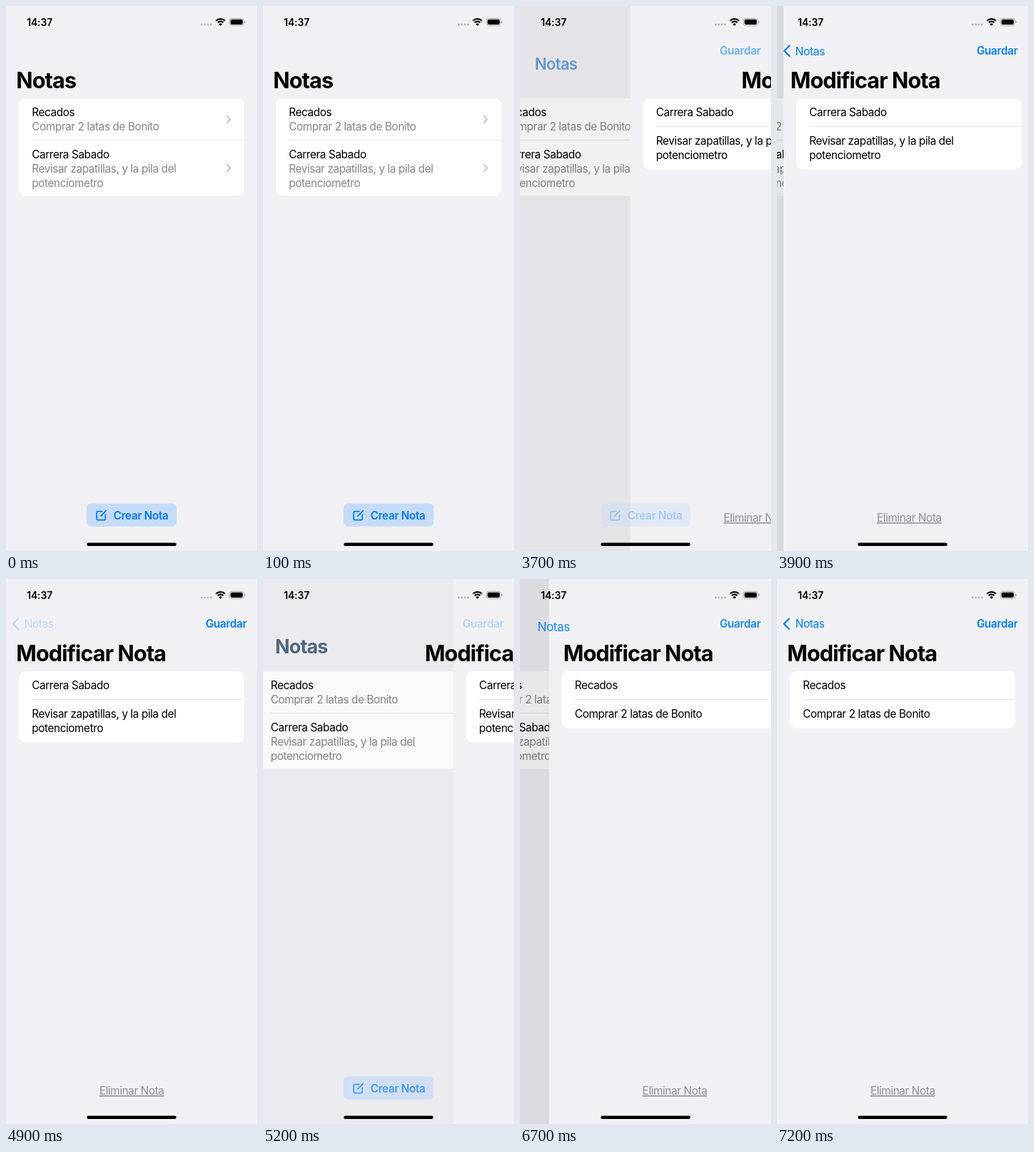
Write an HTML page that moves like this. It is 352 px wide and 762 px high and loops after 8 s.

```html
<!DOCTYPE html>
<html lang="es">
<head>
<meta charset="utf-8">
<title>Notas</title>
<style>
  html, body { margin: 0; width: 100%; height: 100%; overflow: hidden; background: #f1f1f5; }
  svg { display: block; width: 352px; height: 762px; }
  text {
    font: 400 15.34px Inter, "Open Sans", sans-serif;
    font-optical-sizing: none;
    letter-spacing: -.026em;
    white-space: pre;
  }
  .title { font-size: 30.7px; font-weight: 700; letter-spacing: -.031em; }
  .strong { font-weight: 600; letter-spacing: -.022em; }
  .clock { font-size: 13.9px; font-weight: 600; letter-spacing: -.007em; }
  .soft { fill: #85858a; }
  .blue { fill: #007aff; }
  .page { fill: #f1f1f5; }
  .card { fill: #fff; }
  .rule { stroke: #e0e0e3; stroke-width: .8; }
  .line { fill: none; stroke-linecap: round; stroke-linejoin: round; }
  .more { stroke: #c3c3c7; stroke-width: 1.8; }
  .delete { fill: #8e8e93; text-decoration: underline; }
</style>
</head>
<body>
<svg viewBox="0 0 352 762">
  <rect class="page" width="352" height="762"/>

  <g id="list">
    <rect class="card" x="18" y="129" width="316" height="136.5" rx="9"/>
    <text x="36.2" y="154">Recados</text>
    <text class="soft" x="36.2" y="174.2">Comprar 2 latas de Bonito</text>
    <path class="rule" d="M36 187.5H334"/>
    <text x="36.2" y="212.5">Carrera Sabado</text>
    <text class="soft" x="36.2" y="232.5">Revisar zapatillas, y la pila del</text>
    <text class="soft" x="36.2" y="252.5">potenciometro</text>
    <path class="line more" d="M309.8 153.8l4.8 4.7-4.8 4.7M309.8 221.8l4.8 4.7-4.8 4.7"/>
  </g>
  <rect id="dim" width="352" height="762"/>

  <g id="detail">
    <rect class="page" width="352" height="762"/>
    <g id="race">
      <rect class="card" x="18" y="129" width="316" height="99.4" rx="9"/>
      <text x="36.2" y="154">Carrera Sabado</text>
      <text x="36.2" y="193.8">Revisar zapatillas, y la pila del</text>
      <text x="36.2" y="213.8">potenciometro</text>
    </g>
    <g id="errands">
      <rect class="card" x="18" y="129" width="316" height="79.5" rx="9"/>
      <text x="36.2" y="154">Recados</text>
      <text x="36.2" y="193.8">Comprar 2 latas de Bonito</text>
    </g>
    <path class="rule" d="M36 168.5H334"/>
    <text class="delete" x="176.3" y="721" text-anchor="middle">Eliminar Nota</text>
  </g>

  <g id="create">
    <rect x="113" y="695.5" width="126.3" height="32.3" rx="6" fill="#c6dbf7"/>
    <path class="line" stroke="#007aff" stroke-width="1.7"
      d="M135 706.6H129.2a2 2 0 0 0-2 2V716.7a2 2 0 0 0 2 2H137.3a2 2 0 0 0 2-2V711M133 713.2L140.4 705.7"/>
    <text class="blue strong" x="150.7" y="718">Crear Nota</text>
  </g>

  <!-- navigation bar -->
  <text id="heading" class="title" x="14.3" y="115">Modificar Nota</text>
  <text id="big" class="title">Notas</text>
  <g id="back">
    <path id="arrow" class="line" stroke="#007aff" stroke-width="2.2" d="M17 55.5L9.7 62.7L17 69.9"/>
    <text id="small" class="blue">Notas</text>
  </g>
  <text id="save" class="blue strong" x="337.4" y="68" text-anchor="end">Guardar</text>

  <!-- status bar -->
  <text class="clock" x="29.2" y="27.5">14:37</text>
  <g fill="#b9b9bd">
    <circle cx="274.4" cy="26" r="1.4"/>
    <circle cx="278.8" cy="26" r="1.4"/>
    <circle cx="283.2" cy="26" r="1.4"/>
    <circle cx="287.4" cy="26" r="1.4"/>
  </g>
  <path fill="none" stroke="#000" stroke-width="2.1"
    d="M294.4 20.8a9 9 0 0 1 12.8 0M296.9 23.2a5.5 5.5 0 0 1 7.8 0"/>
  <path d="M300.8 27.8l-2.3-2.3a3.25 3.25 0 0 1 4.6 0z"/>
  <rect x="313.3" y="17.3" width="20.2" height="10.2" rx="3.2" fill="none" stroke="#a3a3a7" stroke-width=".9"/>
  <rect x="314.8" y="18.8" width="17.2" height="7.2" rx="2"/>
  <path d="M334.5 20.8q1.5 .5 1.5 1.6t-1.5 1.6z" fill="#a3a3a7"/>
  <rect x="113.3" y="750.5" width="125.6" height="4.5" rx="2.25"/>
</svg>
<script>
  const LOOP = 8000, STEP = 100, WIDTH = 352;
  const PRESS = 4900, SWITCH = 6000;
  const moves = [
    { start: 3597, open: true },
    { start: 5050, open: false },
    { start: 6497, open: true }
  ];
  const el = {};
  document.querySelectorAll('[id]').forEach(node => el[node.id] = node);

  const clamp = v => Math.min(1, Math.max(0, v));
  const mix = (a, b, k) => a + (b - a) * k;
  const place = (node, x, y = 0, scale = 1) =>
    node.setAttribute('transform', `translate(${x} ${y}) scale(${scale})`);
  const fade = (node, k) => node.setAttribute('opacity', clamp(k));
  const show = (node, on) => node.setAttribute('display', on ? 'inline' : 'none');

  // Critically damped spring, from 0 to 1
  function spring(ms, speed) {
    const x = Math.max(0, ms) / 1000 * speed;
    const rest = (1 + x) * Math.exp(-x);
    return rest < .0015 ? 1 : 1 - rest;
  }

  function draw(t) {
    const move = moves.filter(m => m.start <= t).pop() || { start: t, open: true };
    const age = t - move.start;
    const toward = k => move.open ? k : 1 - k;
    const open = toward(spring(age, 18.26));
    const slide = toward(spring(age - 78, 28.3));

    place(el.list, -.3 * WIDTH * open);
    fade(el.dim, .1 * open);
    place(el.detail, WIDTH * (1 - open));
    show(el.race, t < SWITCH);
    show(el.errands, t >= SWITCH);
    fade(el.create, 1 - open * 1.2);

    // The large title shrinks into the back label
    const x = mix(14.3, 25.8, open), y = mix(115, 68, open), width = mix(84, 41, open);
    place(el.big, x, y, width / 84);
    place(el.small, x, y, width / 41);
    fade(el.big, (1 - open) ** 2);
    fade(el.small, open);
    fade(el.arrow, (open - .9) / .07);
    place(el.arrow, 20 * (1 - open));
    fade(el.back, t >= PRESS && t < moves[1].start ? .2 : 1);

    place(el.heading, WIDTH * (1 - slide));
    fade(el.save, open);
  }

  function tick() {
    draw(Math.floor(performance.now() % LOOP / STEP) * STEP);
    requestAnimationFrame(tick);
  }
  tick();
</script>
</body>
</html>
```
